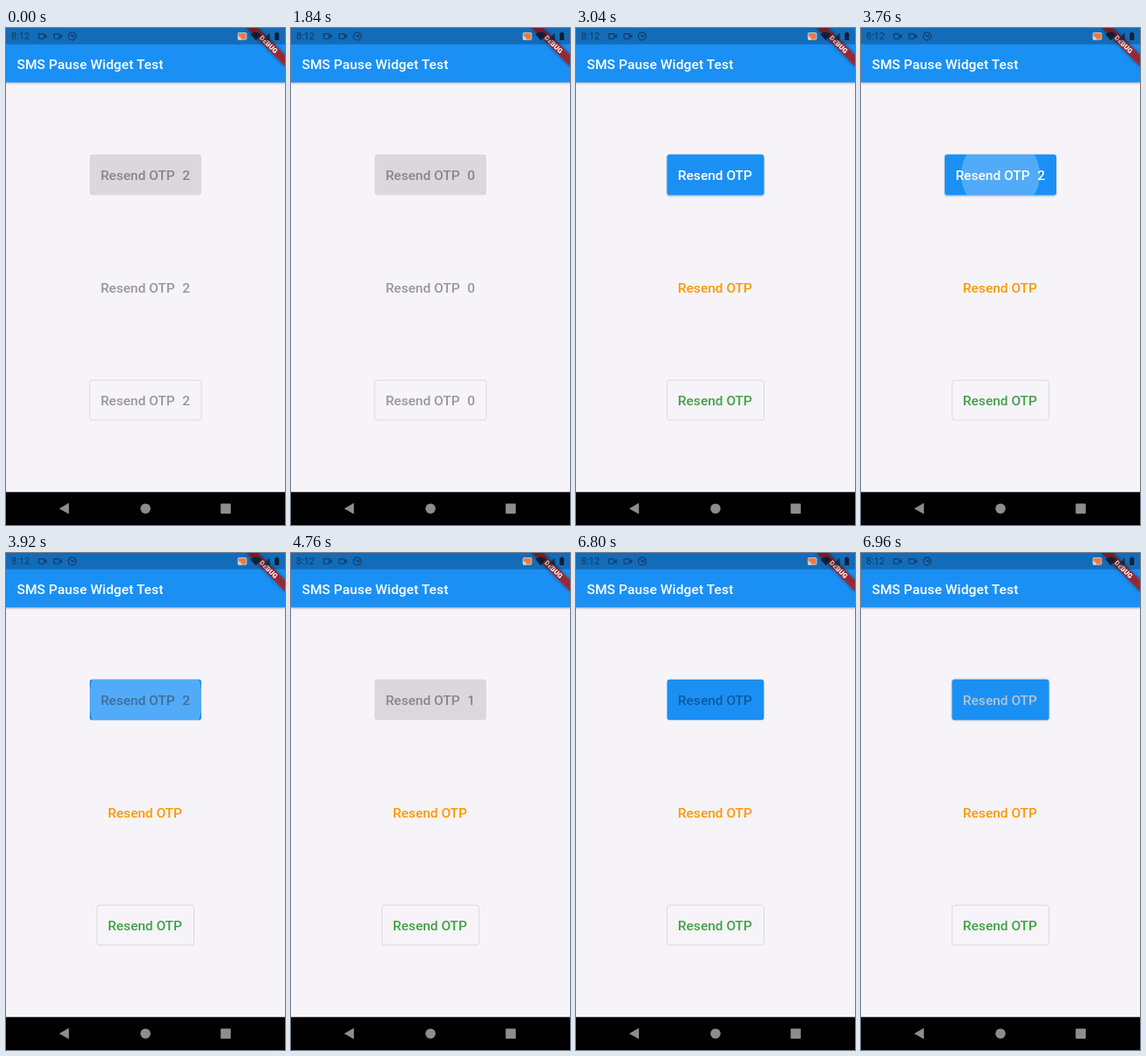
An HTML page for the animation above (7000 ms loop, 320 px wide and 569 px high).

```html
<!DOCTYPE html>
<html lang="en">
<head>
<meta charset="utf-8">
<title>Resend buttons</title>
<style>
  html, body { margin: 0; width: 100%; height: 100%; overflow: hidden; background: #f6f4f8; }
  svg { display: block; width: 100vw; height: 100vh; }
  text { font: 500 15.56px Roboto, sans-serif; white-space: pre; }
  .bar { filter: drop-shadow(0 1.2px 1.3px rgba(0, 0, 0, .28)); }
  .status { font-size: 11px; font-weight: 400; fill: #0d3a66; }
  .banner { font-size: 7.9px; font-weight: 900; fill: #fff; text-anchor: middle; }
</style>
</head>
<body>
<svg viewBox="0 0 320 569">
  <defs>
    <clipPath id="clip"><rect id="clipBox" y="144.8" height="46.5" rx="3.1"/></clipPath>
    <g id="cam" fill="none" stroke="#0d3a66" stroke-width="1.1">
      <rect x=".6" y=".6" width="6.2" height="5.6" rx=".8"/>
      <path d="M7 3.4 9.4 1.4V5.4Z" fill="#0d3a66" stroke-width=".6"/>
    </g>
  </defs>
  <rect width="320" height="569" fill="#f6f4f8"/>
  <rect class="bar" width="320" height="62.3" fill="#1a90f5"/>
  <text x="12.4" y="46.5" fill="#fff" letter-spacing=".1">SMS Pause Widget Test</text>

  <g id="buttons"></g>

  <g transform="translate(320 0) rotate(45)">
    <rect x="-31.1" y="21.8" width="62.2" height="9.3" fill="#b71c1c" fill-opacity=".8"
          style="filter:drop-shadow(0 0 2px rgba(0,0,0,.5))"/>
    <text class="banner" y="29.3">DEBUG</text>
  </g>

  <rect width="320" height="18.7" fill-opacity=".25"/>
  <text class="status" x="6" y="13.4">8:12</text>
  <use href="#cam" x="37" y="6"/>
  <use href="#cam" x="54.5" y="6"/>
  <circle cx="76" cy="9.4" r="4.5" fill="none" stroke="#0d3a66" stroke-width="1.1"/>
  <path d="M73.6 7 78.4 11.8M75 9.3h3V7" fill="none" stroke="#0d3a66"/>
  <rect x="266.2" y="5.6" width="9.6" height="7.6" rx=".8" fill="#f0793a" stroke="#c9d3dc" stroke-width=".9"/>
  <path d="M266 9.6a4 4 0 0 1 4 4h-4z" fill="#c9d3dc"/>
  <g fill="#0b2038">
    <path d="M280.4 7.2Q286.5 2.4 292.6 7.2L286.5 14.2Z"/>
    <path d="M294.4 14 302.6 5.2V14Z" fill-opacity=".75"/>
    <path d="M308.2 5.8h1.4V4.6h2.2v1.2h1.4V14h-5z"/>
  </g>

  <rect y="531.3" width="320" height="37.7"/>
  <g fill="#8d8d8d">
    <path d="M61 550.2 72.2 543.8V556.6Z"/>
    <circle cx="160" cy="550.2" r="5.8"/>
    <rect x="246.2" y="544.4" width="11.6" height="11.6" rx=".8"/>
  </g>
</svg>
<script>
const LOOP = 7000, STEP = 40, FADE = 200;
const WIDE = 128, NARROW = 111.2, PAD = 12.4;
const OFF = [0, 0, 0, .38];
const BLUE = '#1a90f5', GREY = 'rgba(0,0,0,.115)';

const add = (parent, tag, attrs = {}) => {
  const el = document.createElementNS('http://www.w3.org/2000/svg', tag);
  set(el, attrs);
  return parent.appendChild(el);
};
const set = (el, attrs) => {
  for (const k in attrs) el.setAttribute(k, attrs[k]);
};
const clamp = v => Math.min(1, Math.max(0, v));
const ramp = (t, start) => clamp((t - start) / FADE);
const mix = (a, b, p) => `rgba(${a.map((v, i) => v + (b[i] - v) * p)})`;

const group = document.getElementById('buttons');
const clipBox = document.getElementById('clipBox');

function makeButton(y, color, kind) {
  const box = add(group, 'rect', { y, height: 46.5, rx: 3.1, fill: 'none' });
  if (kind === 'outlined') {
    set(box, { y: y + .4, height: 45.7, stroke: '#000', 'stroke-opacity': .13, 'stroke-width': .9 });
  }
  const ripple = kind === 'filled' &&
    add(group, 'circle', { cx: 160, cy: 168, fill: '#fff', 'clip-path': 'url(#clip)' });
  const label = add(group, 'text', { y: y + 29.2 });
  label.textContent = 'Resend OTP';
  const digit = add(group, 'text', { x: 202.3, y: y + 29.2 });
  return { box, ripple, label, digit, color };
}

const filled = makeButton(144.8, [255, 255, 255, 1], 'filled');
const plain = makeButton(273.8, [255, 152, 0, 1], 'text');
const outlined = makeButton(402.8, [67, 160, 73, 1], 'outlined');

// count is null while the button can be pressed
function paint(b, count, on) {
  const width = count === null ? NARROW : WIDE;
  const x = 160 - width / 2, fill = mix(OFF, b.color, on);
  set(b.box, { x, width });
  set(b.label, { x: x + PAD, fill });
  set(b.digit, { fill });
  b.digit.textContent = count === null ? '' : count;
  return { x, width };
}

function countAt(t, start, first) {
  const n = first - Math.floor((t - start) / 1000);
  return Math.max(0, n);
}

function render(t) {
  const active = t >= 2800 && t < 3760 || t >= 6800;
  const on = ramp(t, 2800) - ramp(t, 3760) + ramp(t, 6800);
  const count = active ? null : t < 2800 ? countAt(t, -200, 2) : countAt(t, 3760, 2);
  set(clipBox, paint(filled, count, on));

  const press = t >= 3680 && t < 3760 ? .5 : 0;
  const lift = on + press;
  const blue = t >= 2800 && t < 3960 || t >= 6800;
  set(filled.box, { fill: blue ? BLUE : GREY });
  filled.box.style.filter = blue && lift > 0
    ? `drop-shadow(0 ${1.2 * lift}px ${1.2 * lift}px rgba(0,0,0,.32))` : 'none';

  const p = clamp((t - 3680) / 240);
  const visible = t >= 3680 && t < 3960;
  set(filled.ripple, {
    r: 20 + 45.2 * (1 - (1 - p) ** 2),
    'fill-opacity': visible ? .24 * clamp((t - 3640) / 75) : 0
  });

  const late = t >= 2840 ? null : countAt(t, -160, 2);
  for (const b of [plain, outlined]) paint(b, late, ramp(t, 2840));
}

const begin = performance.now();
function tick() {
  const t = (performance.now() - begin) % LOOP;
  render(Math.floor(t / STEP) * STEP);
  requestAnimationFrame(tick);
}
tick();
</script>
</body>
</html>
```
